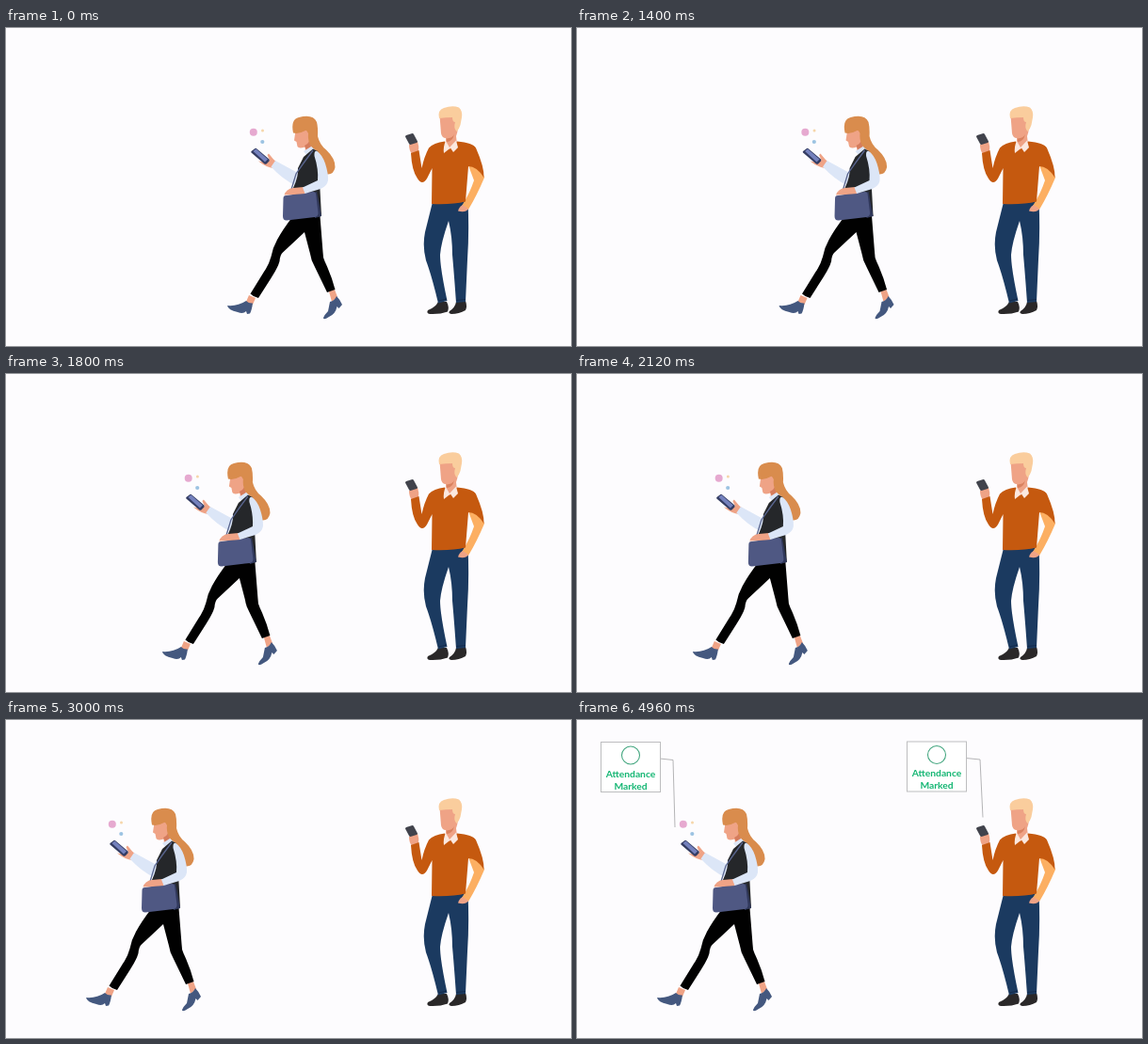
An HTML page that plays this animation: 600x338 px, repeating every 5000 ms.

```html
<!DOCTYPE html>
<html lang="en">
<head>
<meta charset="utf-8">
<style>
  html, body { margin: 0; width: 100%; height: 100%; overflow: hidden; background: #fdfcfe; }
  svg { display: block; width: 100%; height: 100%; }
  text { font: bold 10.3px Lato, "Open Sans", sans-serif; text-anchor: middle; fill: #14b673; }
  .skin { fill: #efa386; }
  .shirt { fill: #dce6f7; }
  .shoe { fill: #44587f; }
  .line { fill: none; stroke: #b4b4b6; stroke-width: 1; }
</style>
</head>
<body>
<svg viewBox="0 0 600 338">
  <defs>
    <linearGradient id="edge" gradientUnits="userSpaceOnUse" y1="0" y2="0">
      <stop stop-color="#fff"/>
      <stop offset="1" stop-color="#000"/>
    </linearGradient>
    <mask id="wipe" maskUnits="userSpaceOnUse" x="20" y="15" width="95" height="110">
      <rect x="20" y="15" width="95" height="110" fill="url(#edge)"/>
    </mask>
  </defs>

  <g id="man">
    <path class="skin" d="M460.500 93L480 92Q481 108 478 115L479 124L471 131L467 124L467 117Q463 117 462 112Z"/>
    <path d="M468 117.500Q474 117 476 113Q474 121 468 121Z" fill="#d98260"/>
    <path d="M460 96Q458 87 465 85Q474 82 481 84.500Q485 88 484 95L482.500 103Q481 108 478.500 110Q475 106 477 100Q474 100 474 95Q467 95 460 96Z" fill="#facd9d"/>
    <path class="skin" d="M428 124L437 120.500Q439 126 438 131L431 134Q428 130 428 124Z"/>
    <path d="M425 114L431.500 112Q432.500 112 433 113L437 120.500Q437 121.500 436 122L429.500 124Q428.500 124 428 123L424 115.500Q424 114.500 425 114Z" fill="#41434c"/>
    <path d="M448 300Q456 297 459 291L468 291Q471 297 469 301.500Q461 304.500 450 304Q446 303 448 300ZM471 301Q477 297 478 291L488 290Q490 296 488 300Q481 304 473 304Q469 303 471 301Z" fill="#2a2829"/>
    <path d="M453 185L490.500 183Q492 218 490 246L488 291L478 292Q476 263 474 241Q474 222 470 205Q462 228 461 241Q461 255 468.500 290L459 292.500Q452 263 446 247Q442 232 445 217Z" fill="#1b3a60"/>
    <path d="M459 290L468 288M478 289.500L488 288.500" stroke="#142b4c" fill="none"/>
    <path d="M491 146L503 146L508 159Q500 178 491 193L484 189Q492 177 497 162Z" fill="#fcaf62"/>
    <path class="skin" d="M485 188L491 192Q488 197 480 194.500Q481 190 485 188Z"/>
    <path d="M466 120.500Q454 122 449 127.500Q444 137 441.500 149L438.500 130L430 133Q431 152 437 160Q442 168 447 160L452.500 149L452 187Q473 188 488 184.500L491 147Q500 147 507.500 159Q508 148 499 127.500Q496 122 479 120.500L471 129Z" fill="#c5590f"/>
    <path d="M467 120L471 127L478 119.500L480 127L475 132L472 127.500L465 133Q464 126 467 120Z" fill="#fbe8df"/>
  </g>

  <g id="woman">
    <circle cx="112.800" cy="110.700" r="4" fill="#e6a9d0"/>
    <circle cx="122.500" cy="109" r="1.500" fill="#f6d6aa"/>
    <circle cx="122.300" cy="121" r="2.100" fill="#9cc3e2"/>
    <path class="skin" d="M108 284L115 287L112 294L105 291ZM193 280L199 278L202 286L196 291Z"/>
    <path class="shoe" d="M85 295Q96 296 105 290Q108 293 112 292.500Q111 300 109 303.500L106 304L105 301Q102 304.500 96 302Q86 300 85 295Z"/>
    <path class="shoe" d="M194 291Q199 290 201 285Q205 289 207 294L203.500 298L201.500 296Q200 304 193 307Q187 311 187 308Q188 305 192 301Z"/>
    <path d="M154 201Q144 214 138 225Q133 234 131.500 243Q129 252 124 259L109.500 282.500Q113 286 118 287L132 265Q139 254 140.500 248Q141 241 144 238.500L167 217L173 240Q174 247 177.500 253L191 281L199.500 278Q196 264 188.500 248Q186.500 244 186.500 238L183.500 200Z" fill="#010101"/>
    <path class="skin" d="M118 141.500L126 143L130 140.500L127.500 135L129 133.500L134 139.500L139 144L134 149Q127 148.500 118 141.500Z"/>
    <path d="M110.500 131L114.500 128Q115.500 127.500 116.500 128.500L129.500 139.500Q130 140.500 129.500 141.500L126.500 144.500Q125.500 145 124.500 144.500L110.500 132.500Q110 131.500 110.500 131Z" fill="#343c62"/>
    <path d="M112.500 131L115.500 128.500L128 139.500L125 142.500Z" fill="#7481bd"/>
    <path class="shirt" d="M136 141L158 153L163 144L166 154L157 167Q144 161 131.500 147.500Z"/>
    <path class="skin" d="M157.500 109L172 106L174 124L175 129L168 132L167.500 126.500Q161 128.500 159.500 126L158.500 121L156 119.500Z"/>
    <path d="M167 125Q171 123 173 119L174 127L169 130Z" fill="#d57c5c"/>
    <path d="M155 111.500Q152 97 161 95Q176 91 180 100Q181.500 106 181 115Q183 124 190 129.500Q200 139 199.500 148Q198 156 191 155.500Q184 154 181 143Q180 132 175 127Q170 121 171 112Q169 108 168 109Q161 113 155 111.500Z" fill="#d98c4d"/>
    <path class="shirt" d="M166 131L174 126L180 131L171 137Z"/>
    <path d="M166 137L176 128.500L181 131Q184 143 183 163L185 200L157 202L155 170Q161 157 160 149Z" fill="#25272a"/>
    <path d="M176 130Q167 142 158 155L152 175" fill="none" stroke="#59658f" stroke-width="1.300"/>
    <path d="M176 175L180 174L185 200L178 202Z" fill="#30385b"/>
    <path d="M144.500 181Q144.500 178 147.500 178L176 174Q178.500 174 179 176L181.500 196Q182 200 178 201L148 204.500Q144 204.500 144 200Z" fill="#4f5883"/>
    <path class="skin" d="M166 169L168 176L156 177L145.500 177.500Q147.500 171 155 170Z"/>
    <path class="shirt" d="M177.500 136Q177 130 180.500 131Q186 135 189 144Q192.500 155 192 162Q191 168 184 171L167.500 176L165 169.500L181 162Q182 150 177.500 136Z"/>
  </g>

  <g id="cards">
    <g mask="url(#wipe)">
      <path class="line" d="M88 41L102 42.500L104 114"/>
      <g id="card">
        <rect x="25.500" y="23.500" width="63" height="53" fill="#fff" stroke="#bdbdbf"/>
        <g id="badge">
          <circle cx="57" cy="37.500" r="10.500" fill="#53ab85"/>
          <path d="M52 38L55.500 41.300L62 34.500" fill="none" stroke="#fff" stroke-width="1.800"/>
        </g>
        <circle id="ring" cx="57" cy="37.500" r="9.500" fill="none" stroke="#45a780" stroke-width="1.100"
          pathLength="1" stroke-dasharray="1 1" transform="rotate(-90 57 37.500)"/>
        <text x="57" y="60.700">Attendance</text>
        <text x="57" y="73.700">Marked</text>
      </g>
    </g>
    <g transform="translate(325 -.5)" mask="url(#wipe)">
      <path class="line" d="M88 41L103 42.500L106 104"/>
      <use href="#card"/>
    </g>
  </g>
</svg>
<script>
  const LOOP = 5000;
  const $ = id => document.getElementById(id);
  const show = (el, on) => el.setAttribute("visibility", on ? "inherit" : "hidden");
  const progress = (t, start, length) => Math.min(1, Math.max(0, (t - start) / length));
  const smooth = u => u ** 3 * (10 - 15 * u + 6 * u * u);

  function draw(t) {
    const walk = 150 * (1 - smooth(progress(t, 843, 2000)));
    $("woman").setAttribute("transform", `translate(${walk} 0)`);

    // Cards are revealed from left to right with a soft edge.
    const front = 24 + 88 * progress(t, 3690, 500);
    $("edge").setAttribute("x1", front - 6);
    $("edge").setAttribute("x2", front);
    $("cards").style.display = t < 3700 ? "none" : "";

    // The badge restarts as a ring that draws itself.
    const restarted = t >= 4440;
    show($("badge"), !restarted);
    show($("ring"), restarted);
    $("ring").setAttribute("stroke-dashoffset", 1 - smooth(progress(t, 4420, 520)));
  }

  const begin = performance.now();
  function tick() {
    draw((performance.now() - begin) % LOOP);
    requestAnimationFrame(tick);
  }
  tick();
</script>
</body>
</html>
```
